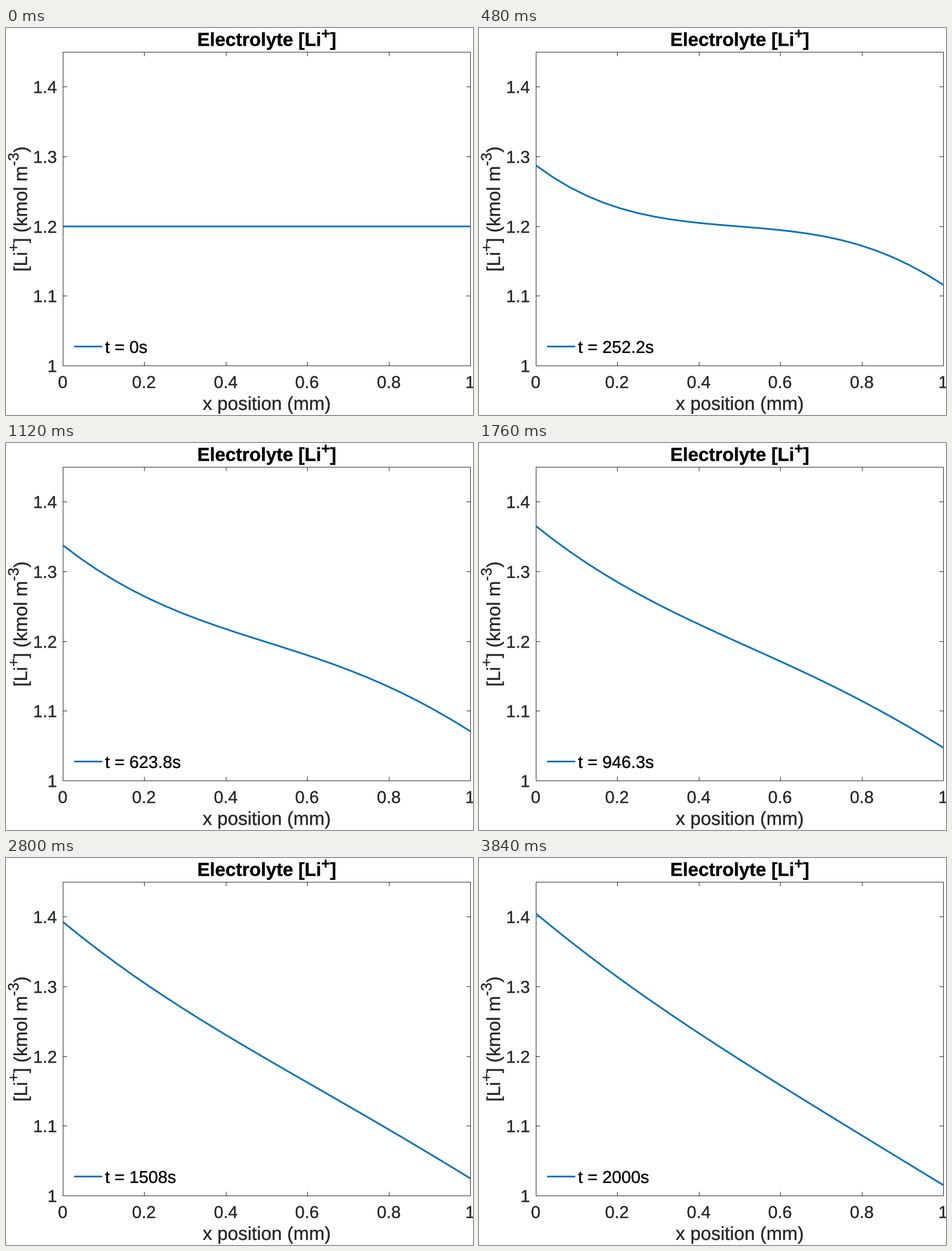
Write a matplotlib script that moves like this. It is 822x681 px and loops after 4000 ms.

```python
import numpy as np
import matplotlib.pyplot as plt
from matplotlib.animation import FuncAnimation
from matplotlib.patches import PathPatch
from matplotlib.path import Path
from matplotlib.textpath import TextPath
from matplotlib.transforms import Affine2D

W, H, DPI = 822, 681, 64
FRAMES, STEP_MS = 50, 80
LEFT, RIGHT, TOP, BOTTOM = 100.5, 817.5, 42.5, 594.5
BLUE, GREY = "#0072BD", "#262626"
PX = 72 / DPI  # points per pixel
TICK, LABEL = 30.2, 33

fig = plt.figure(figsize=(W / DPI, H / DPI), dpi=DPI, facecolor="white")
ax = fig.add_axes([0, 0, 1, 1])
ax.set(xlim=(0, W), ylim=(H, 0))
ax.axis("off")


def to_x(x):
    return LEFT + (RIGHT - LEFT) * x


def to_y(c):
    return BOTTOM - (BOTTOM - TOP) * (c - 1) / 0.45


def crisp(v):
    return np.floor(v) + 0.5


# ---- text as outlines ----
def glyphs(s, size, weight="normal"):
    return TextPath((0, 0), s, size=size,
                    prop={"family": "Liberation Sans", "weight": weight})


def advance(s, size, weight="normal"):
    end = glyphs(s + "|", size, weight).get_extents().x1
    return end - glyphs("|", size, weight).get_extents().x1


def rich(parts, size, rise=0, weight="normal"):
    """Join runs of text; every second one is a superscript."""
    paths, x = [], 0
    for i, s in enumerate(parts):
        px = size * (0.8 if i % 2 else 1)
        shift = Affine2D().translate(x, rise * (i % 2))
        paths.append(glyphs(s, px, weight).transformed(shift))
        x += advance(s, px, weight)
    return Path.make_compound_path(*paths), x


def put(path, x, y, color=GREY, turn=0):
    place = Affine2D().rotate_deg(turn).scale(1, -1).translate(x, y)
    patch = PathPatch(path, fc=color, ec=color, lw=0.4 * PX, snap=False,
                      transform=place + ax.transData)
    return ax.add_artist(patch)


def stroke(xs, ys, color=GREY, width=1):
    return ax.plot(xs, ys, color=color, lw=width * PX, snap=False,
                   solid_capstyle="butt", solid_joinstyle="round")[0]


# ---- axes ----
stroke([LEFT, RIGHT, RIGHT, LEFT, LEFT], [TOP, TOP, BOTTOM, BOTTOM, TOP])
for v in np.linspace(0, 1, 6):
    x, s = crisp(to_x(v)), f"{v:.1g}"
    put(glyphs(s, TICK), x - 0.7 - advance(s, TICK) / 2, 633.5)
    if 0 < v < 1:
        stroke([x, x], [BOTTOM, BOTTOM - 7])
        stroke([x, x], [TOP, TOP + 7])
for v in np.linspace(1, 1.4, 5):
    y, s = crisp(to_y(v)), f"{v:.2g}"
    put(glyphs(s, TICK), 89.7 - advance(s, TICK), y + 10.8)
    if v > 1:
        stroke([LEFT, LEFT + 7], [y, y])
        stroke([RIGHT, RIGHT - 7], [y, y])

mid_x, mid_y = (LEFT + RIGHT) / 2, (TOP + BOTTOM) / 2
title, w = rich(["Electrolyte [Li", "+", "]"], LABEL, 13, "bold")
put(title, mid_x - w / 2, 31.5, "black")
ylabel, w = rich(["[Li", "+", "] (kmol m", "-3", ")"], LABEL, 15)
put(ylabel, 37, mid_y + w / 2, turn=90)
xlabel, w = rich(["x position (mm)"], LABEL)
put(xlabel, mid_x - w / 2, 672)


# ---- diffusion with a constant flux through both ends ----
NODES, DIFF, SLOPE, BEND = 25, 1.37e-4, 0.409, 0.8
grid = np.linspace(0, 1, NODES)
h = grid[1]
cell = np.full(NODES, h)
cell[[0, -1]] = h / 2


def solve(times):
    c, now, out = np.full(NODES, 1.2), 0.0, []
    for t in times:
        n = max(1, int(np.ceil(t - now)))
        dt = (t - now) / n
        for _ in range(n):
            mean = (c[1:] + c[:-1]) / 2
            inner = -DIFF * (1 - BEND * (mean - 1.2)) * np.diff(c) / h
            flux = np.concatenate([[DIFF * SLOPE], inner, [DIFF * SLOPE]])
            c = c - dt * np.diff(flux) / cell
        now = t
        out.append(c)
    return out


# solver output times: the step grows as the profile settles
clock = np.linspace(0, 2000, FRAMES)
times = np.concatenate([
    clock[:6],
    252.2 + 70.11 * np.arange(3),
    462.55 + 161.25 * np.arange(5),
    1307.55 + 200 * np.arange(4),
    [2000],
])
profiles = solve(times)

curve = stroke([], [], BLUE, 3)
stroke([120, 169.5], [560.5, 560.5], BLUE, 3)
legend = put(glyphs("t = 0s", TICK), 174.3, 571.8, "black")


def update(k):
    i = int(np.argmin(np.abs(times - clock[k])))
    curve.set_data(to_x(grid), to_y(profiles[i]))
    legend.set_path(glyphs(f"t = {times[i]:.4g}s", TICK))
    return curve, legend


anim = FuncAnimation(fig, update, frames=FRAMES, interval=STEP_MS, repeat=True)
plt.show()
```
